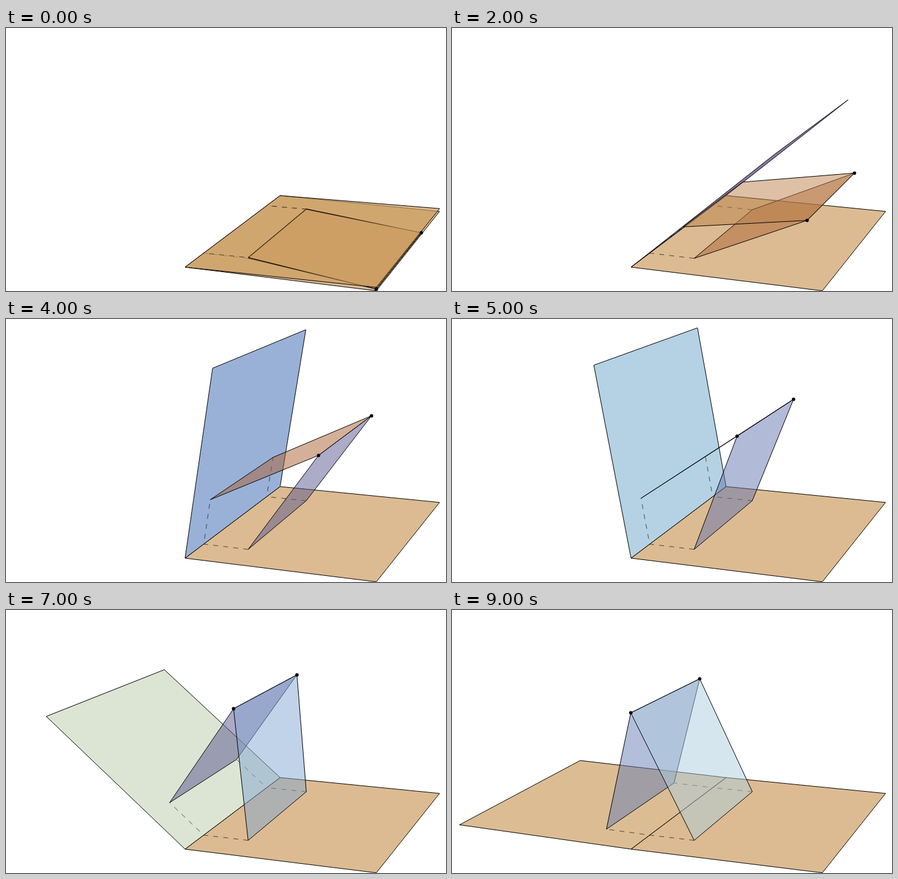
An HTML page that plays this animation: 720 by 430 pixels, repeating every 9250 ms.

```html
<!DOCTYPE html>
<html lang="en">
<head>
<meta charset="utf-8">
<title>Pop-up card</title>
<style>
  html, body { margin: 0; width: 100%; height: 100%; overflow: hidden; background: #fff; }
  svg { display: block; width: 720px; height: 430px; }
</style>
</head>
<body>
<svg id="stage" viewBox="0 0 720 430" stroke-linejoin="round"></svg>
<script>
const stage = document.getElementById('stage');
const STEP = 250, STEPS = 37;
const ATTACH = 0.25, ARM = 0.75;

// Homogeneous camera columns: origin, across the page, along the hinge, up
const ORIGIN = [293, 391, 1], AX = [279.85, 15.2, -0.0547],
      AY = [254.6, -56.45, 0.221], AZ = [-13.1, -320.2, -0.0339];

// Surface colour by the angle of the normal that faces the viewer
const SHADES = [
  [-54, 80, 55, 110], [-36, 92, 91, 148], [-25, 101, 117, 175], [-9, 111, 145, 199],
  [-1, 133, 168, 210], [11, 149, 191, 216], [19, 173, 205, 221], [51, 206, 219, 194],
  [90, 205, 159, 100], [117, 171, 100, 54], [132, 148, 72, 46]
];

function project(x, y, z) {
  const [u, v, w] = ORIGIN.map((o, i) => o + AX[i] * x + AY[i] * y + AZ[i] * z);
  return [u / w, v / w];
}

function shade(angle) {
  let i = 1;
  while (i < SHADES.length - 1 && SHADES[i][0] < angle) i++;
  const a = SHADES[i - 1], b = SHADES[i];
  const k = Math.max(0, Math.min(1, (angle - a[0]) / (b[0] - a[0])));
  return `rgb(${[1, 2, 3].map(c => Math.round(a[c] + (b[c] - a[c]) * k))})`;
}

const pts = list => list.map(p => p.map(v => v.toFixed(2)).join()).join(' ');

// Quad between two lines parallel to the hinge; p and q are cross-section points
function face(p, q, from, to, opacity) {
  const corners = [
    project(p[0], from[0], p[1]), project(p[0], from[1], p[1]),
    project(q[0], to[1], q[1]), project(q[0], to[0], q[1])
  ];
  const [a, b, , d] = corners;
  const top = (b[0] - a[0]) * (d[1] - a[1]) - (b[1] - a[1]) * (d[0] - a[0]) > 0;
  const slope = Math.atan2(q[1] - p[1], q[0] - p[0]) * 180 / Math.PI;
  const svg = `<polygon points="${pts(corners)}" fill="${shade(slope + (top ? 90 : -90))}"
    fill-opacity="${opacity}" stroke="#000"/>`;
  return { corners, top, svg };
}

const line = (a, b, extra = '') =>
  `<polyline points="${pts([a, b])}" fill="none" stroke="#000" ${extra}/>`;

function dashes(p, fromHinge) {
  return [1 / 6, 5 / 6].map(y => {
    const root = project(0, y, 0), end = project(p[0], y, p[1]);
    const style = 'stroke-opacity=".65" stroke-dasharray="8 8.5"';
    return fromHinge ? line(root, end, style + ' stroke-dashoffset="73.6"') : line(end, root, style);
  }).join('');
}

// Arm edges that show through the closed card and fade towards the fold
function fadingEdges(arm) {
  const [a, b, c, d] = arm.corners;
  return [[a, d], [b, c]].map(([s, e], i) =>
    `<linearGradient id="fade${i}" gradientUnits="userSpaceOnUse"
      x1="${s[0]}" y1="${s[1]}" x2="${e[0]}" y2="${e[1]}">
      <stop offset=".25"/><stop offset=".85" stop-opacity="0"/></linearGradient>
     <polyline points="${pts([s, e])}" fill="none" stroke="url(#fade${i})" stroke-width="1.3"/>`
  ).join('');
}

function draw(step) {
  const t = Math.min(1 + 5 * step, 179) * Math.PI / 180, h = t / 2;
  const reach = ATTACH * Math.cos(h) + Math.sqrt(ARM ** 2 - (ATTACH * Math.sin(h)) ** 2);
  const tip = [Math.cos(t), Math.sin(t)];
  const fold = [reach * Math.cos(h), reach * Math.sin(h)];
  const rootR = [ATTACH, 0], rootL = tip.map(v => v * ATTACH);

  const whole = [0, 1], base = [1 / 6, 5 / 6], ridge = [0, 2 / 3];
  const floor = face([0, 0], [1, 0], whole, whole, 0.7);
  const page = face([0, 0], tip, whole, whole, 0.7);
  const right = face(rootR, fold, base, ridge, 0.5);
  const left = face(rootL, fold, base, ridge, 0.5);

  const arms = left.top ? right.svg + left.svg : left.svg + right.svg;
  const cover = page.svg + dashes(rootL, true);
  const seam = line(left.corners[0], left.corners[1]);
  const dots = left.corners.slice(2).map(p => `<circle cx="${p[0]}" cy="${p[1]}" r="2.8"/>`).join('');

  stage.innerHTML = floor.svg + dashes(rootR, false) +
    (page.top ? arms + cover + seam : cover + arms) +
    (step === 0 ? fadingEdges(left) + line(left.corners[2], left.corners[3]) : '') + dots;
}

let start = null, shown = -1;
function tick(now) {
  if (start === null) start = now;
  const step = Math.floor((now - start) / STEP) % STEPS;
  if (step !== shown) draw(shown = step);
  requestAnimationFrame(tick);
}
draw(0);
requestAnimationFrame(tick);
</script>
</body>
</html>
```
